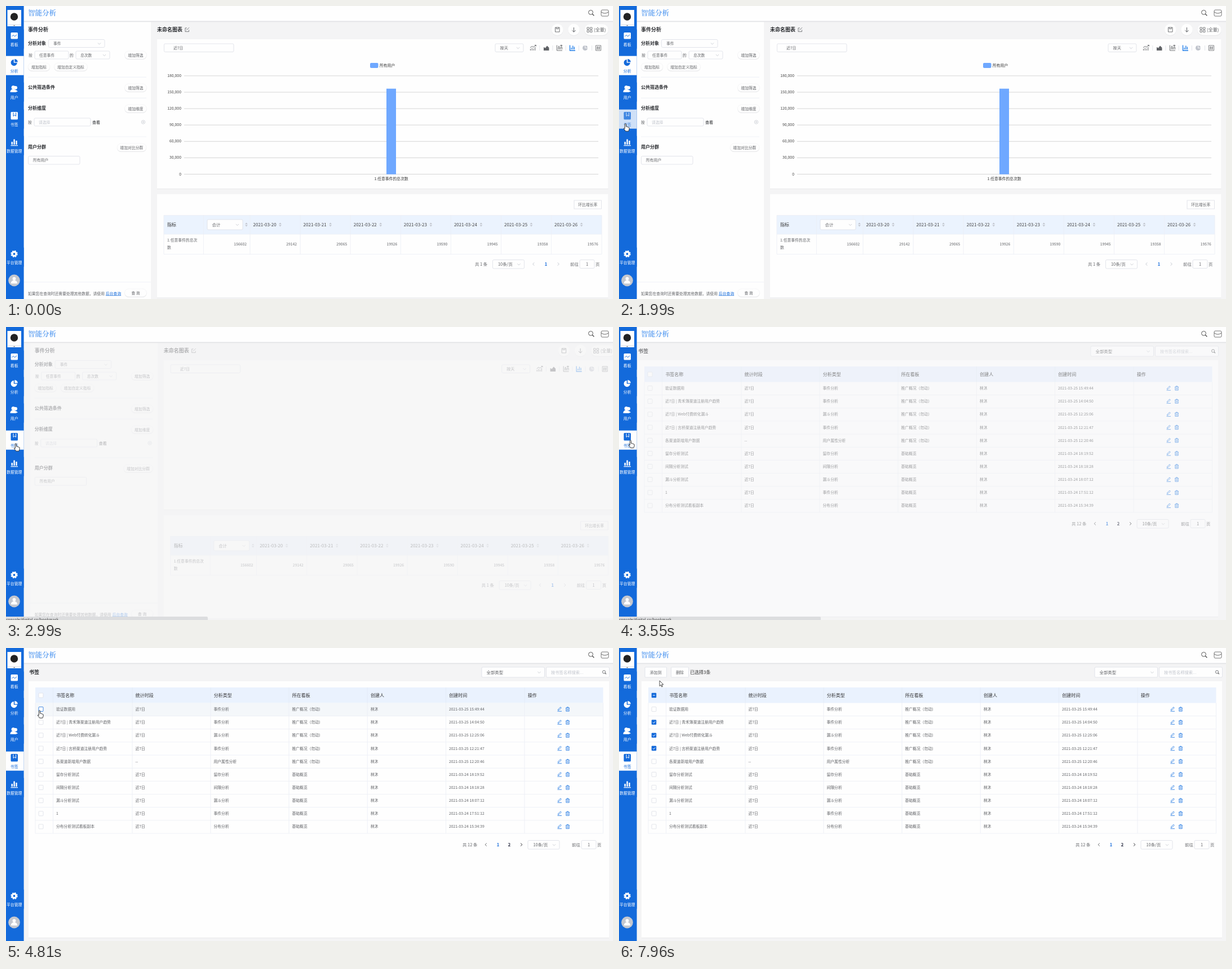
Recreate the animation shown at these times as an HTML page. Size 1077x520 px, loop 8000 ms.

```html
<!DOCTYPE html>
<html>
<head>
<meta charset="utf-8">
<style>
  html, body { margin: 0; width: 100%; height: 100%; overflow: hidden; background: #f4f4f5; }
  svg { display: block; width: 1077px; height: 520px; font-family: "Noto Sans CJK SC", "Noto Sans CJK", "Open Sans", sans-serif; }
  text { white-space: pre; }
</style>
</head>
<body>
<svg id="stage" viewBox="0 0 1077 520"></svg>
<script>
const LOOP = 8000, BLUE = '#136adb', GREY = '#606266', DARK = '#26282c', PALE = '#c0c4cc', LINE = '#dcdfe6', CELL = '#ebeef5', WHITE = '#fefefe';
const BOLD = 'font-weight="700"', MID = 'text-anchor="middle"', END = 'text-anchor="end"';
const range = n => [...Array(n).keys()];
const each = (list, f) => list.map(f).join('');

// drawing helpers; text is placed by its vertical middle
const text = (x, y, s, size = 6.8, fill = GREY, more = '') =>
  `<text x="${x}" y="${y + size * .37}" font-size="${size}" fill="${fill}" ${more}>${s}</text>`;
const rect = (x, y, w, h, fill, more = '') => `<rect x="${x}" y="${y}" width="${w}" height="${h}" fill="${fill}" ${more}/>`;
const path = (d, stroke = GREY, width = .8, fill = 'none') => `<path d="${d}" stroke="${stroke}" stroke-width="${width}" fill="${fill}"/>`;
const solid = (d, fill) => path(d, 'none', 0, fill);
const circle = (x, y, r, fill, more = '') => `<circle cx="${x}" cy="${y}" r="${r}" fill="${fill}" ${more}/>`;
const hline = (x1, x2, y, c = CELL) => path(`M${x1} ${y}H${x2}`, c, .8);
const vline = (x, y1, y2, c = CELL) => path(`M${x} ${y1}V${y2}`, c, .8);
const box = (x, y, w, h, rx = 2) => rect(x, y, w, h, WHITE, `rx="${rx}" stroke="${LINE}" stroke-width=".8"`);
const chevron = (x, y) => path(`M${x - 2.6} ${y - 1.3}l2.6 2.6 2.6-2.6`, PALE, .8);
const arrow = (x, y, d, c) => path(`M${x - d} ${y - 2.6}l${2 * d} 2.6 ${-2 * d} 2.6`, c, .9);
const field = (x, y, w, h, s, pad = 8, size = 6.8, fill = GREY) => box(x, y, w, h) + text(x + pad, y + h / 2, s, size, fill);
const select = (x, y, w, h, s, pad = 8, size = 6.8) => field(x, y, w, h, s, pad, size) + chevron(x + w - 9.5, y + h / 2 + .3);
const pill = (cx, cy, w, s, h = 14) =>
  rect(cx - w / 2, cy - h / 2 + 1, w, h, '#e3e4e6', `rx="${h / 2}"`) +
  rect(cx - w / 2, cy - h / 2, w, h, WHITE, `rx="${h / 2}" stroke="#f0f0f1" stroke-width=".6"`) +
  text(cx, cy, s, 6.8, GREY, MID);
const sorter = (x, y) => solid(`M${x - 2.4} ${y - .8}l2.4-2.6 2.4 2.6zM${x - 2.4} ${y + .8}l2.4 2.6 2.4-2.6z`, PALE);
const lens = (x, y, r, c, w) => circle(x, y, r, 'none', `stroke="${c}" stroke-width="${w}"`) +
  path(`M${x + r * .7} ${y + r * .7}l${r * .8} ${r * .8}`, c, w * 1.4);
const card = (x, y, w, h) => rect(x, y + .8, w, h, '#e6e7e9') + rect(x, y, w, h, WHITE);
const pager = (x, y) => text(x, y, '前往', 7.4) + box(x + 17, y - 7.5, 26, 15) + text(x + 30, y, '1', 7.4, GREY, MID) + text(x + 45, y, '页', 7.4);

// sidebar
const ITEMS = [
  [53, '看板', y => rect(8.5, y - 6, 12.5, 11.5, 'currentColor', 'rx="1.5"') + path(`M10.5 ${y + 1}l2.5-2.5 2.5 2.5 3.5-3`, 'var(--bg)', 1)],
  [100, '分析', y => solid(`M13.8 ${y - 5}V${y + .8}H19.8A5.6 5.6 0 1 1 13.8 ${y - 5}z`, 'currentColor') + solid(`M15.3 ${y - 6}A5.5 5.5 0 0 1 20.8 ${y - .6}H15.3z`, 'currentColor')],
  [147, '用户', y => circle(17, y - 2, 3, 'currentColor') + solid(`M13 ${y + 5}q4-6 8 0z`, 'currentColor') + circle(13, y - 2.4, 3.4, 'currentColor') + solid(`M7.5 ${y + 6}q0-5.5 5.5-5.5t5.5 5.5z`, 'currentColor')],
  [195, '书签', y => rect(8.5, y - 7, 12.5, 13.5, 'currentColor', 'rx="1.5"') + path(`M13 ${y - 6}v6.5l2.3-2 2.3 2v-6.5`, 'var(--bg)', 1)],
  [242, '数据管理', y => solid(`M9.5 ${y - 1}h2.4v5h-2.4zM13.4 ${y - 5.5}h2.4v9.5h-2.4zM17.3 ${y - 3}h2.4v7h-2.4zM8.5 ${y + 5}h12.5v1.2H8.5z`, 'currentColor')],
  [440, '平台管理', y => circle(14.5, y, 3.4, 'none', 'stroke="currentColor" stroke-width="3"') + circle(14.5, y, 5.4, 'none', 'stroke="currentColor" stroke-width="1.6" stroke-dasharray="2.6 1.64"')]
];
const sidebar = rect(0, 0, 31.6, 520, BLUE) + rect(2.5, 7, 24.5, 29, WHITE) + hline(2.5, 27, 33, '#d5d9e0') +
  solid('M12.8 34h3.6l-1.8 1.5z', GREY) + circle(14.5, 19, 6.7, '#222') +
  each(ITEMS, ([y, name, icon], i) => `<g id="item${i}">` + rect(0, y - 11.3, 31.6, 34, 'var(--bg)') + icon(y) + text(14.7, y + 15, name, 6.9, 'currentColor', MID) + '</g>') +
  circle(14.5, 487, 10.4, '#c3c7cf') + circle(14.5, 484, 2.9, '#fff') + solid('M8.8 492.5q0-5.5 5.7-5.5t5.7 5.5z', '#fff');

const header = rect(31.6, 26.5, 1046, 1.8, '#e1e2e5') + rect(31.6, 0, 1046, 26.5, WHITE) +
  text(39, 12.3, '智能分析', 12.5, '#69a6f2', BOLD + ' font-family="Noto Serif CJK SC, Noto Serif, Noto Sans CJK SC, serif"') +
  lens(1037.5, 11.3, 3.9, '#555', 1) + box(1056, 7, 13, 11, 2).replace(LINE, '#555') + path('M1056 10.5q6.5 5 13 0', '#555', .9);

// analysis page
const panel = rect(31.6, 27, 225.5, 493, WHITE) + text(39, 41.5, '事件分析', 9, DARK, BOLD) +
  each([[66.5, '分析对象'], [144, '公共筛选条件'], [181.5, '分析维度'], [250, '用户分群']], ([y, s]) => text(39, y, s, 8, DARK, BOLD)) +
  select(75.5, 59.5, 99.5, 14, '事件', 8.5) + text(40, 87, '按') + field(51, 80, 60, 14, '任意事件') + text(113, 87, '的') + select(124, 80, 60, 14, '总次数') +
  pill(230, 87, 39, '增加筛选') + pill(58.5, 108, 39, '增加指标') + pill(115, 108, 59, '增加自定义指标') +
  pill(230, 145, 39, '增加筛选') + pill(230, 182, 39, '增加维度') + pill(223, 251, 52, '增加对比分群') +
  each([126.3, 163.3, 232], y => hline(39, 249, y)) +
  text(39, 206, '按') + field(50, 199, 100, 14, '请选择', 8, 6.8, PALE) + text(153, 206, '查看', 7.1, DARK) +
  circle(243.5, 206, 3.2, 'none', `stroke="${PALE}" stroke-width=".7"`) + path('M241.8 206h3.4M243.5 204.3v3.4', PALE, .7) +
  field(39.5, 266.5, 91.5, 14.5, '所有用户', 8.5) + hline(31.6, 257, 490) +
  text(39, 510, '如果您在查询时还需要处理其他数据，请使用') + text(177, 510, '后台查询', 6.8, BLUE, 'text-decoration="underline"') + pill(230, 509, 39, '查 询');

const tools = each([946.8, 970, 993.2, 1016.4, 1039.6], x => vline(x, 70, 79, LINE)) +
  path('M930.5 79v-3M933.2 79v-4.5M936 79v-3.5M938.8 79v-6M930 74l3.2-2.5 2.7 1.5 4.5-3.5h-2.5m2.5 0v2', GREY, .9) +
  solid('M954 79v-6l3 1.5 3-4 3.5 3.5v5z', GREY) +
  path('M977.5 69.5v9.5h9.5M980 77v-4h2v4M984 77v-4h2.5v4M980 71.5h2M984 71h2.5v-1.5H984z', GREY, .9) +
  path('M1000.5 69.5v9.5h9.5M1003.2 77v-3M1005.8 77v-6.5M1008.4 77v-4.5', '#1b7be8', 1.3) +
  circle(1027.5, 74.5, 4.5, PALE) + path('M1027.5 70v4.5h4.5', WHITE, .9) +
  path('M1046.5 70h9v9h-9zM1049.5 71.5l-.6 6M1053 71.5l-.6 6M1048 73.3h6M1048 76h6', GREY, .8);

const chart = rect(646, 101, 14.5, 9, '#6fa8ff', 'rx="2"') + text(663, 105.3, '所有用户', 6.8, '#333') +
  each(range(7), i => hline(316, 1051, 298.5 - i * 29.1, '#cccccc') + text(311, 298 - i * 29.1, (i * 30000).toLocaleString('en-US'), 6.9, '#444', END)) +
  rect(675, 146.7, 17, 152, '#6fa8ff') + text(683.5, 306, '1.任意事件的总次数', 6.8, '#333', MID);

const TOTALS = [156602, 29142, 29065, 19926, 19590, 19945, 19358, 19576];
const colX = i => i < 0 ? 350.5 : 433 + 89.1 * i;
const totals = rect(280, 371.5, 777, 33.5, '#ebf3fe') + rect(280, 405, 777, 35.5, '#f5f7fa', 'id="rowA"') +
  each([371.5, 405, 440.5], y => hline(280, 1057, y)) + vline(280, 371.5, 440.5) + vline(1057, 371.5, 440.5) +
  each(range(8), i => vline(colX(i - 1), 371.5, 440.5) + text(colX(i) - 6, 422, TOTALS[i], 6.8, GREY, END)) +
  text(286, 388, '指标', 8, '#333') + select(357, 379, 63, 18, '合计', 8.5, 7.4) + sorter(426.5, 388) +
  each(range(7), i => text(colX(i) + 5.5, 388, '2021-03-' + (20 + i), 8, '#444') + sorter(colX(i) + 53.5, 388)) +
  text(286, 415.5, '1.任意事件的总次') + text(286, 428.5, '数');

const analysis = panel + text(268, 42, '未命名图表', 9, DARK, BOLD) + path('M321 39h-3v6.5h6.5v-3.2M320 43.2l5-5', GREY, .8) +
  each([978.3, 1007.5], x => circle(x, 43, 10.2, '#e6e7e9') + circle(x, 42, 10.2, WHITE)) +
  path('M974.5 38h7.5v8h-7.5zM976.5 38v2.5h3.5V38', GREY, .9) + path('M1007.5 38v8M1004.3 43l3.2 3.2 3.2-3.2', GREY, 1) +
  pill(1047.5, 42, 43, '', 20) + path('M1031 38h3.4v3.4H1031zM1036.5 38h3.4v3.4h-3.4zM1031 43h3.4v3.4H1031zM1036.5 43h3.4v3.4h-3.4z', GREY, .8) + text(1043, 42.3, '(全量)', 8) +
  card(268, 59, 800.5, 265) + field(280.5, 67, 123.5, 14.5, '近7日', 16.5) + select(868, 67, 50, 14.5, '按天', 8.5, 7.2) + tools +
  `<g id="chart">${chart}</g>` + card(268, 334, 800.5, 183.5) + box(1008, 345, 48.5, 15, 0) + text(1032.3, 352.5, '环比增长率', 6.8, GREY, MID) + totals +
  text(832, 458, '共 1 条', 7.4) + select(863.5, 450.5, 56, 15.5, '10条/页', 9.5, 7.4) + arrow(936, 458, -1.4, PALE) +
  text(958, 458, '1', 7.6, BLUE, BOLD + ' ' + MID) + arrow(980, 458, 1.4, PALE) + pager(1001, 458);

// bookmark page
const COLS = [52, 83.5, 224, 363, 502, 641.3, 780.5, 920, 1059.5];
const ROW = 23.15, TOP = 97.5, rowMid = i => 108.6 + ROW * i;
const RECORDS = [
  ['验证数据用', '事件', '25 15:49:44'], ['近7日 | 青禾簿渠道注册用户趋势', '事件', '25 14:04:50'],
  ['近7日 | Web付费转化漏斗', '漏斗', '25 12:25:06'], ['近7日 | 言桥渠道注册用户趋势', '事件', '25 12:21:47'],
  ['各渠道新增用户数据', '用户属性', '25 12:20:46'], ['留存分析测试', '留存', '24 18:19:52'],
  ['间隔分析测试', '间隔', '24 18:18:28'], ['漏斗分析测试', '漏斗', '24 18:07:12'],
  ['1', '事件', '24 17:51:12'], ['分布分析测试看板副本', '分布', '24 15:34:39']
];
const checkbox = (y, id, mark) => rect(58, y - 4, 8, 8, WHITE, `id="box${id}" rx="1" stroke="${LINE}" stroke-width=".8"`) +
  `<g id="tick${id}">` + rect(57.8, y - 4.2, 8.4, 8.4, BLUE, 'rx="1"') + path(mark, '#fff', 1) + '</g>';
const record = ([name, kind, date], i) => {
  const y = rowMid(i), cells = [name, i === 4 ? '--' : '近7日', kind + '分析', i < 5 ? '推广概况（勿动）' : '基础概览', '林沐', '2021-03-' + date];
  return hline(52, 1059.5, TOP + ROW * (i + 1)) + checkbox(y, i, `M60 ${y}l1.6 1.7 2.7-3.2`) +
    each(cells, (s, k) => text(COLS[k + 1] + 5.5, y, s)) +
    path(`M979.3 ${y + 2}l.5-1.8 4-4 1.4 1.4-4 4zM978.5 ${y + 3.7}h7.5`, '#2f80e4', .9) +
    path(`M993 ${y - 2.2}h7M995.2 ${y - 2.5}v-1.2h2.6v1.2M993.8 ${y - 2}v5.6h5.4v-5.6M995.6 ${y - .5}v2.8M997.4 ${y - .5}v2.8`, '#2f80e4', .9);
};
const bookmarks = `<g id="title">${text(41, 42.5, '书签', 9, DARK, BOLD)}</g><g id="bar">` +
  box(46, 34, 38.5, 18, 1) + text(65.3, 43, '添加到', 7, GREY, MID) + box(92.5, 34, 31, 18, 1) + text(108, 43, '删除', 7, GREY, MID) +
  text(126, 43, '已选择<tspan id="count">1</tspan>条', 8, '#333') + '</g>' +
  select(844, 34, 111.5, 18, '全部类型', 8.5, 7.4) + field(958.5, 34, 112, 18, '按书签名称搜索...', 8.5, 7.3, PALE) + lens(1061, 42.5, 2.6, GREY, .9) +
  card(40, 59, 1030, 455) + rect(52, 70, 1007.5, 27.5, '#eaf2fe') + rect(52, 0, 1007.5, ROW, '#f4f7fa', 'id="rowB"') +
  each(COLS, x => vline(x, TOP, TOP + 10 * ROW)) + each(COLS.slice(1, -1), x => vline(x, 70, TOP, '#e3eaf5')) + checkbox(84, 'All', 'M60 84h4') +
  each(['书签名称', '统计时段', '分析类型', '所在看板', '创建人', '创建时间', '操作'], (s, i) => text(COLS[i + 1] + 5.8, 84, s, 8, '#333')) +
  each(RECORDS, record) +
  text(810, 349, '共 12 条', 7.4) + arrow(851.5, 349, -1.4, GREY) + text(873, 349, '1', 7.6, BLUE, BOLD + ' ' + MID) +
  text(893, 349, '2', 7.6, '#20243a', BOLD + ' ' + MID) + arrow(914.5, 349, 1.4, DARK) + select(926, 341.5, 56, 15.5, '10条/页', 9.5, 7.4) + pager(1004, 349);

const status = rect(-3, 514, 361, 12, '#dcdddf', 'id="bubble" rx="2"') + text(0, 519.8, 'console/digital.cn/bookmark', 6.9, '#444');
const pointer = `<g id="arrow">${path('M0 0v9.6l2.3-2.1 1.5 3.5 1.5-.6-1.5-3.5h3z', '#222', .8, '#fff')}</g>` +
  `<g id="hand">${path('M-1.2 1q0-1.2 1.1-1.2t1.1 1.2v4q2-.4 2.2.7 1.8-.4 2 .8 1.6-.2 1.5 1.4 0 3-1.4 5.3h-5.2q-1.3-2.4-3.2-4.4-.4-1.6 1.9-.4z', '#222', .9, '#fff')}</g>`;

stage.innerHTML = `<g id="pageA">${analysis}</g><g id="pageB">${bookmarks}</g>` + header + sidebar +
  `<g id="status">${status}</g><g id="cursor">${pointer}</g>`;

const $ = id => document.getElementById(id);
const show = (id, o) => { $(id).style.opacity = +o; };
const clamp = p => Math.max(0, Math.min(1, p));

// the CSS "ease" curve
function ease(p) {
  let a = 0, b = 1, u = .5;
  for (let i = 0; i < 20; i++) {
    u = (a + b) / 2;
    if (.75 * u * (1 - u) + u ** 3 < p) a = u; else b = u;
  }
  return .3 * u * (1 - u) ** 2 + 3 * u * u * (1 - u) + u ** 3;
}

// pointer path: time, x, y
const PATH = [
  [440, 1064, 526], [800, 930, 470], [1060, 640, 425], [1260, 503, 396], [1300, 500, 397], [1550, 260, 414], [1750, 90, 330],
  [1900, 33, 235], [1990, 11.5, 209], [2090, 13.5, 208.5], [2150, 16.5, 208], [2310, 16.5, 208], [2410, 17.5, 207], [3420, 17.5, 207],
  [3700, 24, 195], [3870, 25.5, 189], [4220, 27, 188], [4400, 42, 150], [4590, 59.5, 111], [4810, 59.5, 111], [5300, 60, 128],
  [5780, 60, 128], [6150, 60, 152], [6390, 60, 152], [6470, 60.5, 169.5], [6990, 60, 176], [7690, 60, 176], [7960, 72, 58]
];
function pointAt(t) {
  const k = PATH.findIndex(p => p[0] > t);
  if (k <= 0) return (k ? PATH.at(-1) : PATH[0]).slice(1);
  const [t0, x0, y0] = PATH[k - 1], [t1, x1, y1] = PATH[k], p = (t - t0) / (t1 - t0);
  return [x0 + (x1 - x0) * p, y0 + (y1 - y0) * p];
}

const CHECKS = { 1: 5640, 2: 6400, 3: 7180 };

function render(t) {
  const [x, y] = pointAt(t), [hx, hy] = pointAt(t - 70);
  const inB = t > 3380, leave = ease(clamp((t - 2790) / 500)), enter = ease(clamp((t - 3380) / 500));
  show('pageA', 1 - leave);
  $('pageA').setAttribute('transform', `translate(${17 * leave})`);
  show('pageB', enter);
  $('pageB').setAttribute('transform', `translate(${17 * (enter - 1)})`);
  show('chart', t < 2700);
  show('rowA', t < 2570 && hx > 280 && hx < 1057 && hy > 405 && hy < 440);

  ITEMS.forEach(([iy], i) => {
    const active = i === (t < 2570 ? 1 : 3), hover = x < 31 && y > iy - 11.3 && y < iy + 22.7;
    const style = $('item' + i).style;
    style.setProperty('--bg', active ? WHITE : hover ? '#cfe0f7' : BLUE);
    style.color = active ? BLUE : hover ? '#3f86e2' : '#fff';
  });

  const row = Math.floor((hy - TOP) / ROW);
  show('rowB', inB && hx > 52 && row >= 0 && row < 10);
  $('rowB').setAttribute('y', TOP + ROW * row);
  let count = 0, onBox = false;
  RECORDS.forEach((_, i) => {
    const over = inB && Math.abs(x - 62) < 5 && Math.abs(y - rowMid(i)) < 4.6;
    onBox ||= over;
    $('box' + i).setAttribute('stroke', over ? BLUE : LINE);
    show('tick' + i, clamp((t - (CHECKS[i] ?? Infinity)) / 150));
    if (t >= CHECKS[i]) count++;
  });
  show('tickAll', count > 0);
  show('bar', count > 0);
  show('title', !count);
  $('count').textContent = count || 1;

  show('status', t >= 2310 && t < 4350);
  $('bubble').setAttribute('width', t < 2600 ? 97 : 361);
  const hand = x < 31 || onBox;
  show('hand', hand);
  show('arrow', !hand);
  $('cursor').setAttribute('transform', `translate(${x} ${y})`);
}

const start = performance.now();
function tick() {
  render((performance.now() - start) % LOOP);
  requestAnimationFrame(tick);
}
tick();
</script>
</body>
</html>
```
